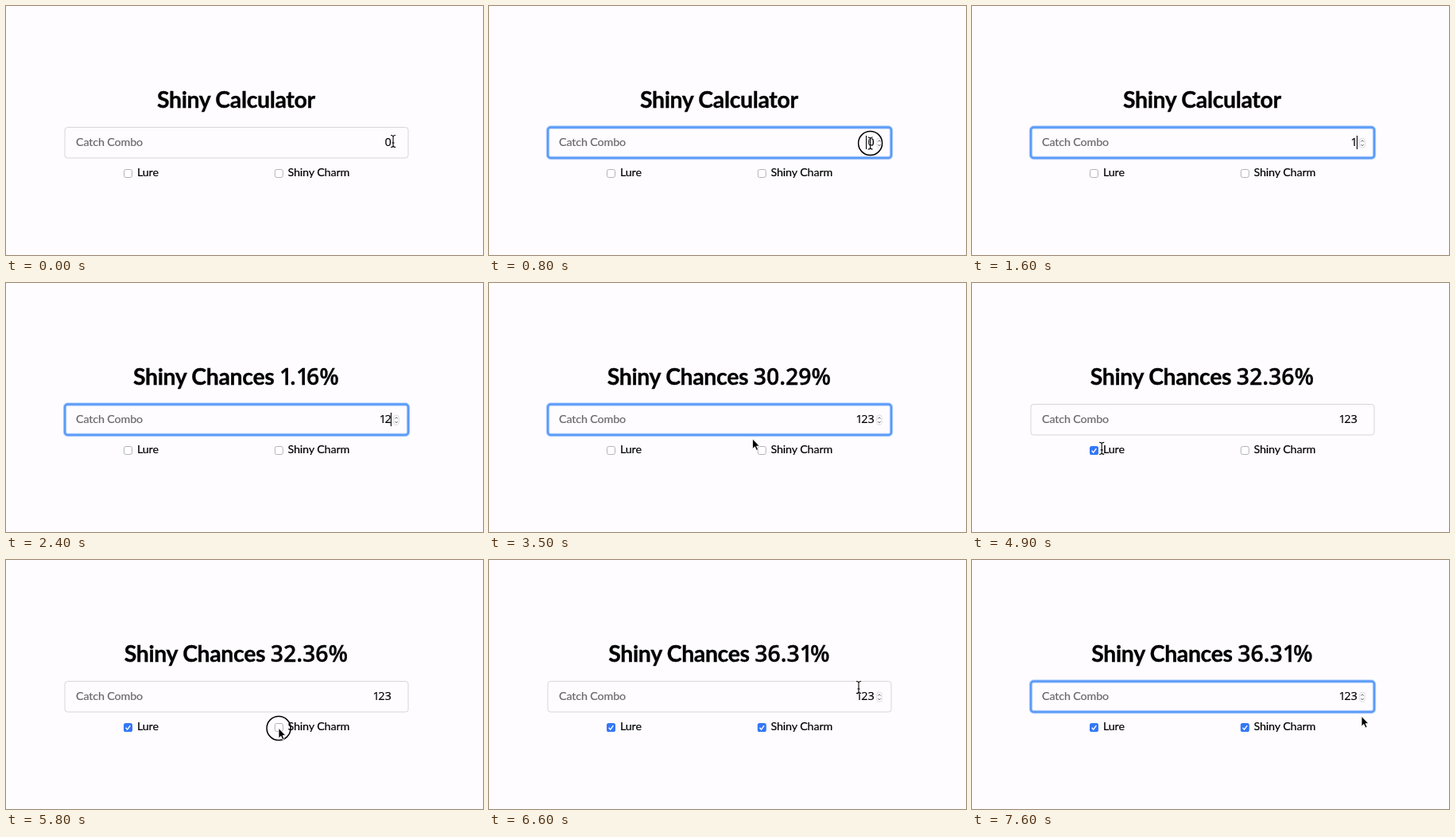
Recreate the animation shown at these times as an HTML page. Size 600 by 313 pixels, loop 8 s.

```html
<!DOCTYPE html>
<html lang="en">
<head>
<meta charset="utf-8">
<title>Shiny Calculator</title>
<style>
  html, body { margin: 0; width: 100%; height: 100%; overflow: hidden; background: #fefcff; }
  svg { display: block; width: 100%; height: 100%; }
  text { font: 14.3px Lato, "Open Sans", sans-serif; letter-spacing: -.14px; fill: #000; stroke: #000; stroke-width: .2px; }
  .head { font-size: 28.4px; font-weight: 700; letter-spacing: -.32px; text-anchor: middle; stroke-width: .35px; }
  .num { font-family: "Open Sans", "Noto Sans", sans-serif; font-weight: 600; letter-spacing: 0; }
  .value { font-size: 14.5px; font-weight: 400; text-anchor: end; }
  .hint { fill: #68676b; stroke: #68676b; }
</style>
</head>
<body>
<svg viewBox="0 0 600 313">
  <defs>
    <path id="bar" d="M-3-7.5Q0-7.5 0-5.5Q0-7.5 3-7.5M0-6V6M-3 7.5Q0 7.5 0 5.5Q0 7.5 3 7.5M-1.5 2H1.5"/>
    <rect id="frame" x="74" y="152.5" width="432" height="38.5" rx="3.5"/>
    <g id="off"><rect x=".5" y=".5" width="10" height="10" rx="2.3" fill="#fff" stroke="#b3b2b6"/></g>
    <g id="on">
      <rect width="11" height="11" rx="2.6" fill="#3478f6"/>
      <path d="M2.7 5.8l2 2.3 3.6-5" fill="none" stroke="#fff" stroke-width="1.4"/>
    </g>
  </defs>

  <text class="head" x="289.3" y="127.5"><tspan id="title"></tspan><tspan class="num" id="odds"></tspan></text>

  <use href="#frame" fill="none" stroke="#d6d5da"/>
  <g id="ring" fill="none" stroke="#5a9af8">
    <use href="#frame" stroke-width="4.4" stroke-opacity=".45"/>
    <use href="#frame" stroke-width="2.4"/>
  </g>
  <text class="hint" x="88" y="176.3">Catch Combo</text>
  <rect id="mark" x="474" y="162.5" width="11" height="18" fill="#b4d5fe"/>
  <text class="num value" x="484.8" y="176.3"><tspan id="value"></tspan></text>
  <rect id="caret" y="163" width="1.1" height="17"/>
  <g id="spin" fill="none">
    <rect x="487.8" y="166" width="6.4" height="12.4" rx="3.2" fill="#fff" stroke="#dcdbdf"/>
    <path d="M489.4 170.6l1.6-1.9 1.6 1.9M489.4 174l1.6 1.9 1.6-1.9" stroke="#555" stroke-width=".9"/>
  </g>

  <use id="lure" x="148" y="205"/>
  <text x="165" y="214.2">Lure</text>
  <use id="charm" x="337.8" y="205"/>
  <text x="354.5" y="214.2">Shiny Charm</text>

  <g id="mouse">
    <circle id="press" r="15" fill="none" stroke="#000" stroke-width="1.5"/>
    <path id="arrow" d="M0 0V12.6L2.9 9.9 4.9 14.4 7 13.5 5 9.1H8.8Z" stroke="#fff" stroke-width=".8"/>
    <g id="beam" fill="none">
      <use href="#bar" stroke="#fff" stroke-width="2.6" stroke-opacity=".7"/>
      <use href="#bar" stroke="#000" stroke-width="1.1"/>
    </g>
  </g>
</svg>
<script>
const LOOP = 8000, STEP = 100, LAG = 200, BLINK = 500;
const $ = id => document.getElementById(id);

const home = { x: 487, y: 170 };
const moves = [
  { from: 100, to: 400, x: 477, y: 172 },
  { from: 700, to: 1100, x: 498, y: 176 },
  { from: 2900, to: 3300, x: 342, y: 195 },
  { from: 3400, to: 4000, x: 153.5, y: 211.5 },
  { from: 4800, to: 5300, x: 275, y: 166 },
  { from: 5300, to: 5700, x: 343, y: 211.5 },
  { from: 6100, to: 6600, x: 465, y: 160 },
  { from: 6600, to: 6800, x: 475, y: 117 },
  { from: 6800, to: 7000, x: 477, y: 171 },
  { from: 7200, to: 7500, x: 490, y: 196.5 }
];
const clicks = [
  { on: "field", from: 400, to: 1100, caret: 474 },
  { on: "lure", from: 4100, to: 4400 },
  { on: "charm", from: 5800, to: 6000 },
  { on: "field", from: 7100, to: 7300, caret: 476.5 }
];
const keys = [1600, 2200, 2700].map(from => ({ from, caret: 483.8 }));

const ease = k => k < .5 ? 2 * k * k : 1 - 2 * (1 - k) ** 2;
const latest = (list, t) => list.filter(e => e.from <= t).pop();
const show = (id, on) => $(id).setAttribute("visibility", on ? "inherit" : "hidden");
const inside = (p, l, t, r, b) => p.x >= l && p.x <= r && p.y >= t && p.y <= b;

function pointer(t) {
  let p = home;
  for (const m of moves) {
    if (t <= m.from) break;
    const k = ease(Math.min(1, (t - m.from) / (m.to - m.from)));
    p = { x: p.x + (m.x - p.x) * k, y: p.y + (m.y - p.y) * k };
  }
  return p;
}

function form(t) {
  const ticked = id => clicks.some(c => c.on === id && c.from + STEP <= t);
  const typed = keys.filter(k => k.from <= t).length;
  return { combo: +"123".slice(0, typed), lure: ticked("lure"), charm: ticked("charm") };
}

// Chance of at least one success over the whole combo, cut to two decimals.
function chance({ combo, lure, charm }) {
  const base = combo > 30 ? 12 : combo > 20 ? 8 : combo > 10 ? 4 : 1;
  const p = (base + lure + 2 * charm) / 4096;
  return (Math.floor((1 - (1 - p) ** combo) * 1e4) / 100).toFixed(2) + "%";
}

// Close the gap after each narrow "1".
function setNumber(id, s) {
  $(id).textContent = s;
  $(id).setAttribute("dx", [...s].map((c, i) => s[i - 1] === "1" ? "-.11em" : "0").join(" "));
}

function draw(t) {
  const now = form(t), shown = form(t - LAG);
  $("title").textContent = shown.combo ? "Shiny Chances\u00a0" : "Shiny Calculator";
  setNumber("odds", shown.combo ? chance(shown) : "");
  setNumber("value", String(now.combo));
  for (const id of ["lure", "charm"]) $(id).setAttribute("href", now[id] ? "#on" : "#off");

  const click = latest(clicks, t), key = latest(keys, t);
  const focused = click?.on === "field";
  const input = [click, key].filter(e => e?.caret).sort((a, b) => a.from - b.from).pop();
  const selected = t >= clicks[0].from + BLINK && !key;
  if (input) $("caret").setAttribute("x", input.caret);
  show("caret", focused && !selected && (t - input.from) % (2 * BLINK) < BLINK);
  show("mark", selected && focused);

  const p = pointer(t);
  const inField = inside(p, 74, 152, 506, 191);
  const beam = inField || inside(p, 162, 200, 192, 219) || inside(p, 353, 200, 434, 219);
  show("ring", focused);
  show("spin", focused || (inField && t > STEP));
  $("mouse").setAttribute("transform", `translate(${p.x} ${p.y})`);
  show("mouse", !key || latest(moves, t - STEP).from > key.from);
  show("press", click && t < click.to);
  show("beam", beam);
  show("arrow", !beam);
}

let last = -1;
function tick(now) {
  const t = Math.floor(now % LOOP / STEP) * STEP;
  if (t !== last) draw(last = t);
  requestAnimationFrame(tick);
}
draw(0);
requestAnimationFrame(tick);
</script>
</body>
</html>
```
